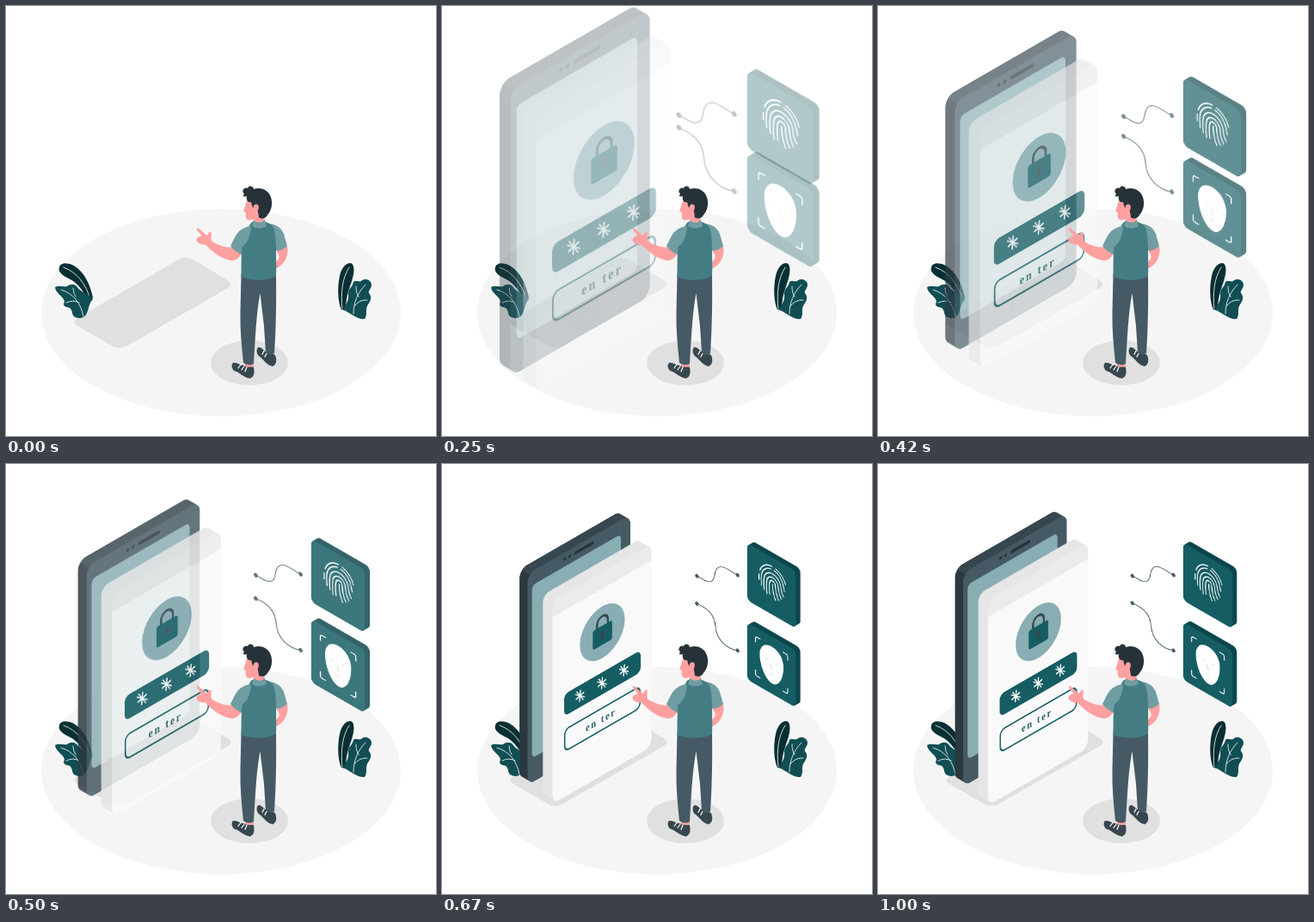
An HTML page without scripts that plays this animation: 500x500 px, repeating every 1040 ms.

```html
<!DOCTYPE html>
<html lang="en">
<head>
<meta charset="utf-8">
<title>Secure login</title>
<style>
html, body { margin: 0; width: 100%; height: 100%; overflow: hidden; background: #fff; }
svg { display: block; width: 100%; height: 100%; }
.pop { animation: pop 1040ms linear infinite; }
.phone { transform-origin: 155px 212.5px; }
.panel { transform-origin: 181px 240px; }
.touch { transform-origin: 355px 139.5px; }
.face { transform-origin: 355px 221px; }
@keyframes pop {
  0%, 8% { opacity: 0; transform: scale(1.572); }
  56% { opacity: 1; transform: scale(1.048); }
  78% { opacity: 1; transform: scale(.9956); }
  100% { opacity: 1; transform: scale(1.048); }
}
.line { fill: none; stroke-linecap: round; stroke-linejoin: round; }
.wire { stroke: #455a64; stroke-width: .9; }
.white { stroke: #fff; }
.skin { fill: #ffa0a0; }
.teal { fill: #155d63; }
.deep { fill: #0b464c; }
.ink { fill: #263238; }
text { font: bold 11.5px "Liberation Serif", "Noto Serif", serif; letter-spacing: 1.9px; fill: #285f66; }
</style>
</head>
<body>
<svg viewBox="0 0 500 500">
<defs>
  <g id="tile">
    <path class="deep" d="M-5.8-.8a5 5 0 0 1 5-5H52.7a5 5 0 0 1 3.5 1.5l5.8 5.8a5 5 0 0 1 1.5 3.5V59.500a5 5 0 0 1-5 5H5a5 5 0 0 1-3.5-1.5l-5.8-5.8a5 5 0 0 1-1.5-3.5z"/>
    <rect class="teal" width="63.5" height="64.5" rx="5"/>
  </g>
  <!-- upright star: undoes the panel skew -->
  <path id="star" class="line white" stroke-width="1.3" transform="matrix(1.155 .577 0 1 0 0)" d="M.5-6.300-.5 6.300M-3.500-4.300 3.500 4.300M4.300-4-4.300 4M-5-1.200 5 1.200"/>
  <ellipse id="dot" rx="1.8" ry="2.5" fill="#455a64" transform="rotate(-35)"/>
</defs>

<!-- floor -->
<ellipse cx="250" cy="356.5" rx="209" ry="120.5" fill="#f5f5f5"/>
<path fill="#e0e0e0" d="M83 363 200 295Q209 290 218 295L258 319Q265 324 258 328L141 395Q132 400 123 395L83 372Q76 368 83 363z"/>
<ellipse cx="283" cy="415" rx="45" ry="26" fill="#e0e0e0"/>

<!-- plants -->
<g>
  <path fill="#082f33" d="M62 304C63 298 72 298 79 302C91 309 98 324 101 339L97 346C92 333 83 322 75 318C67 314 60 310 62 304z"/>
  <path class="line white" stroke-width=".8" d="M67 304C82 309 93 323 98 341"/>
  <path fill="#104e54" d="M57 327C61 324 66 327 71 326C75 323 80 323 83 327C86 333 96 333 101 341C96 346 97 351 94 357C91 364 84 364 79 361C76 358 78 354 74 351C70 350 65 349 68 344C67 337 58 335 57 327z"/>
  <path class="line white" stroke-width=".8" d="M64 330C78 334 87 345 90 361M78 328Q78 334 81 338M70 345Q78 341 85 345"/>
</g>
<g>
  <path fill="#082f33" d="M390 353C386 345 385 328 388 314C390 304 396 298 401 299C406 301 405 311 402 320C398 332 395 340 395 354z"/>
  <path class="line white" stroke-width=".8" d="M399 304C391 316 389 334 391 352"/>
  <path fill="#104e54" d="M392 353C396 345 399 342 398 335C398 328 403 327 404 321C407 318 411 322 414 319C418 316 425 319 425 324C425 329 421 330 422 334C426 338 424 343 421 347C417 352 421 358 417 364C409 365 402 358 392 353z"/>
  <path class="line white" stroke-width=".8" d="M418 324C409 333 404 345 404 358M407 326Q407 334 410 338M420 342Q411 341 405 349"/>
</g>

<!-- handset -->
<g class="pop phone">
  <g transform="matrix(.866 -.5 0 1 101 130)">
    <path fill="#2a383f" d="M-10.4-.4a10 10 0 0 1 10-10H113.6a10 10 0 0 1 7.1 2.9l10.4 10.4a10 10 0 0 1 2.9 7.1V229a10 10 0 0 1-10 10H10a10 10 0 0 1-7.1-2.9l-10.4-10.4a10 10 0 0 1-2.9-7.1z"/>
    <path fill="#37474f" d="M-7.5-7.5A10 10 0 0 1-.4-10.4H113.6a10 10 0 0 1 7.1 2.9L131.1 2.9 124 0H10A10 10 0 0 0 2.9 2.9z"/>
    <rect width="134" height="239" rx="10" fill="#455a64"/>
    <rect x="5.8" y="16" width="116.2" height="195.5" rx="5" fill="#88adb2"/>
    <path class="line" stroke="#263238" stroke-width="3.4" d="M48.5 7.6h.1M55 7.6h.1M63 7.6H85"/>
    <rect x="62" y="220" width="24" height="12" rx="4.5" fill="none" stroke="#37474f"/>
  </g>
</g>

<!-- login panel -->
<g class="pop panel">
  <g transform="matrix(.866 -.5 0 1 130 161)">
    <path fill="#e6e6e6" d="M-12.7-3.7a9 9 0 0 1 9-9H107.3a9 9 0 0 1 6.4 2.6l12.7 12.7a9 9 0 0 1 2.6 6.4V221a9 9 0 0 1-9 9H9a9 9 0 0 1-6.4-2.6l-12.7-12.7a9 9 0 0 1-2.6-6.4z"/>
    <rect width="129" height="230" rx="9" fill="#ebebeb"/>
    <path fill="#f9f9f9" d="M0 19H129V221a9 9 0 0 1-9 9H9a9 9 0 0 1-9-9z"/>
    <g transform="translate(0 4)">
      <circle cx="65" cy="64.3" r="29.3" fill="#88adb2"/>
      <path class="line" stroke="#37474f" stroke-width="2.6" d="M58.2 59V53a7 7 0 0 1 14 0V59"/>
      <rect class="teal" x="52.6" y="57" width="25.2" height="21.5" rx="2.5"/>
      <circle cx="65.2" cy="65.5" r="2.6" fill="#37474f"/>
      <path class="line" stroke="#37474f" stroke-width="2" d="M65.2 67V72.5"/>
      <g transform="translate(0 .6)">
        <rect class="teal" x="15" y="109" width="100" height="25" rx="6"/>
        <use href="#star" x="35.8" y="121"/>
        <use href="#star" x="64.6" y="121"/>
        <use href="#star" x="93.3" y="121"/>
        <rect x="15.8" y="149.500" width="98.400" height="24.5" rx="6" fill="#fafafa" stroke="#155d63" stroke-width="1.7"/>
        <text x="43.3" y="165.6">en ter</text>
      </g>
    </g>
  </g>
</g>

<!-- fingerprint -->
<g class="pop touch">
  <path class="line wire" d="M298 130.5C304 133 310 139 315 136C320 133 316 121 325 120C331 120 337 126 344 129.500"/>
  <use href="#dot" x="298" y="130.5"/>
  <use href="#dot" x="344" y="129.5"/>
  <use href="#tile" transform="matrix(-.866 -.5 0 1 410 125)"/>
  <g class="line white" stroke-width="1.2" transform="matrix(.866 .5 0 1 383.5 140)">
    <path d="M0 0C0 7 1 11 4 16"/>
    <path d="M-3.6 13C-4.5 6 -4.5 2-3.6-1a3.7 3.7 0 0 1 7.2 0C4 6 5 10 8 14"/>
    <path d="M-7.2 14C-8 7-8 2-7.2-2a7.4 7.4 0 0 1 14.4 0C8 5 9 7 11.5 11"/>
    <path d="M-10.8 11C-11.5 6-11.6 1-10.8-3a11 11 0 0 1 21.6 0C11.5 2 12 4 14.5 7"/>
    <path d="M-14.2 8C-15 3-15-2-14-6C-12-12-7-16-2-16.5M2-16.5C8-16 13-11 14.2-5L15.5 0"/>
    <path d="M-17.6 3V-3M-16.5-8C-14-15-8-20-1-20M4-19.5C10-18 15-14 17-8"/>
  </g>
</g>

<!-- face scan -->
<g class="pop face">
  <path class="line wire" d="M298 164C310 169 318 176 319 190C320 204 331 215 344 217"/>
  <use href="#dot" x="298" y="164"/>
  <use href="#dot" x="344" y="217"/>
  <use href="#tile" transform="matrix(-.866 -.5 0 1 410 217)"/>
  <g transform="matrix(.866 .5 0 1 382.5 233.5)">
    <path class="line white" stroke-width="1.1" d="M-21-16V-20Q-21-22-19-22H-15M15-22H19Q21-22 21-20V-16M21 16V20Q21 22 19 22H15M-15 22H-19Q-21 22-21 20V16"/>
    <path fill="#fff" d="M0-21C10-21 15.5-14 15.5-5C15.5 8 9 20.5 1 20.5C-8 20.5-15.5 8-15.5-5C-15.5-14-9-21 0-21z"/>
    <path class="line" stroke="#e4e4e4" stroke-width="1.2" d="M-7.500-3H-5.500M5.500-4H7.500M0-1-1.5 4H1.500M-2 10H2"/>
  </g>
</g>

<!-- visitor -->
<g>
  <path class="skin" d="M315 282 327 279C329 289 325 298 318 303L313 306 313.500 298C317 295 320 291 315 286z"/>
  <path class="skin" d="M278 412H288V423H278zM303 400H312V409H303z"/>
  <path fill="#37474f" d="M264 415C268 414 272 418 277 418C280 421 285 419 288 420C289 426 289 431 284 433C276 432 272 426 265 424C262 421 262 417 264 415z"/>
  <path fill="#37474f" d="M293 397C297 396 300 401 303 403C306 406 311 404 313 406C315 411 315 417 310 419C303 418 300 411 294 407C291 404 291 399 293 397z"/>
  <path class="line white" stroke-width="1.2" d="M270 421 273 417M274 423 277 419M278 425 280 420M298 405 300 401M301 408 303 404"/>
  <path fill="#455a64" d="M273.500 312H314C314.500 345 314 375 312 404Q307 407 302 403L300 372 295.500 334C291 357 290 385 288 416Q282 419 276 415C274 395 272 376 272.500 356z"/>
  <path class="skin" d="M222 258C225 258 229 264 234 267Q236 262 238.500 263C239 267 238 271 239 273C246 278 255 281 262 280.500L266 276 275 286C272 292 268 296 262 296C250 294 240 286 232 277.500C228 278 223 276 221.500 273C221 269 225 268 227.500 267C225 263 221 261 222 258z"/>
  <path fill="#6f9da1" d="M285 256C276 257 270 261 266 269L261 279C265 284 269 287 274 289L286 274zM305 253C315 254 320 258 323 265L327 279C323 283 318 285 313 284z"/>
  <path fill="#447c83" d="M286 251C281 256 281 264 276 275C273 280 274 300 273.500 315C285 320 304 320 314 314C315 300 313 282 315 270C316 260 310 254 302 251z"/>
  <path fill="#6f9da1" d="M285 256C281 256 278 260 277 266L274 280C280 277 284 269 285 256zM306 253C313 255 313 264 314 280L320 275 318 258z"/>
  <path class="skin" d="M281 222C279 229 278 234 276 239L279 240C278 245 279 249 283 249L288 248 289 254C293 257 299 255 301 252L300 237 293 222z"/>
  <path fill="#6f9da1" d="M288 249Q295 255 301 249L303 256Q294 261 286 256z"/>
  <path class="ink" d="M277 218C273 216 277 210 281 212C282 208 288 209 288 213C296 210 304 214 307 220C311 228 309 238 304 243C302 247 298 248 294 246L293 239 287 235 285 228C281 229 279 225 280 221Q274 223 277 218z"/>
  <ellipse class="skin" cx="290.500" cy="235" rx="3.200" ry="4.600" transform="rotate(12 290.500 235)"/>
</g>
</svg>
</body>
</html>
```
